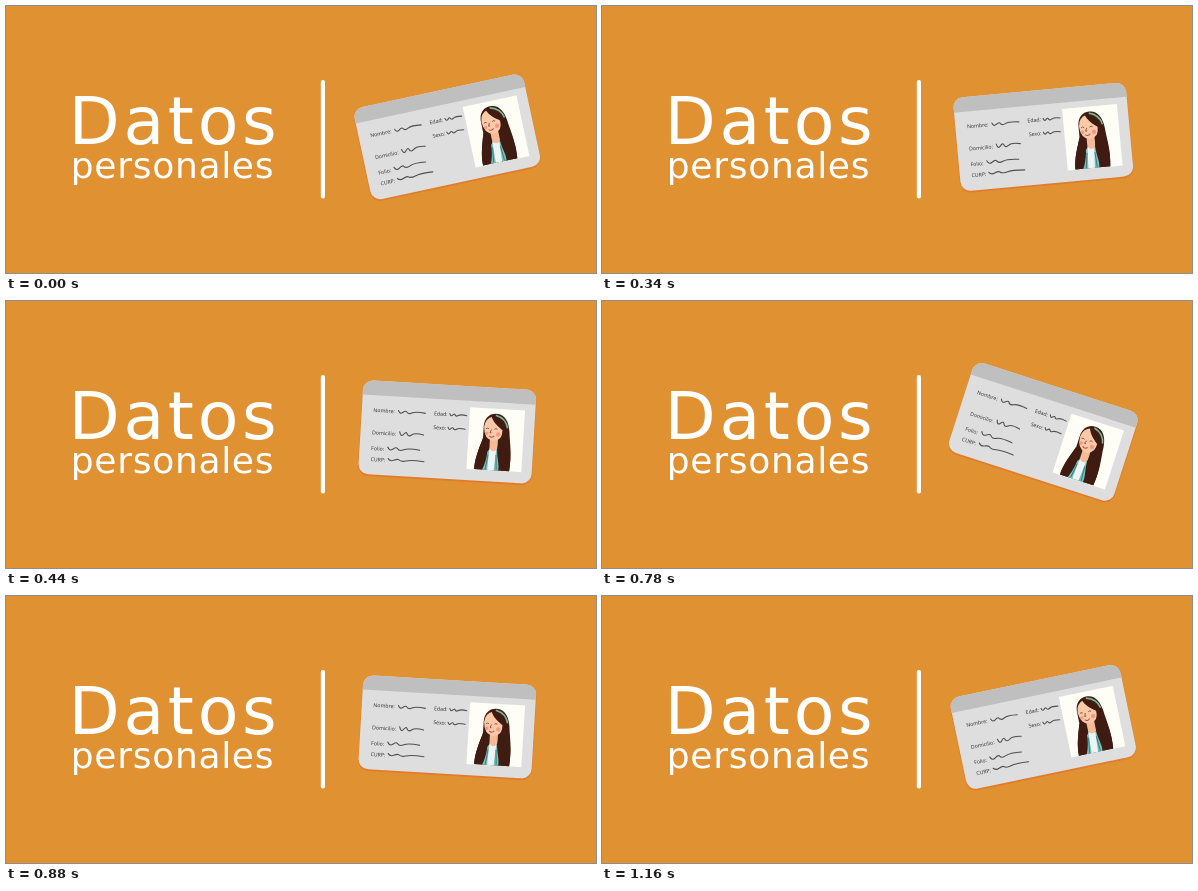
Animation, 590 px wide and 267 px high, one loop 1200 ms. Source, as an HTML page:

```html
<!DOCTYPE html>
<html lang="es">
<head>
<meta charset="utf-8">
<style>
  html, body { margin: 0; width: 100%; height: 100%; overflow: hidden; background: #e09132; }
  svg { display: block; width: 100%; height: 100%; }
  .title { fill: #fff; font-family: "DejaVu Sans", sans-serif; }
  #labels { font: 500 5.2px "Open Sans", sans-serif; fill: #2c2c2c; }
  #scribbles { fill: none; stroke: #505050; stroke-width: 1.1; stroke-linecap: round; stroke-linejoin: round; }
</style>
</head>
<body>
<svg viewBox="0 0 590 267">
  <rect width="590" height="267" fill="#e09132"/>
  <text class="title" x="62.5" y="138" font-size="66.5" letter-spacing="3.7">Datos</text>
  <text class="title" x="64.8" y="172" font-size="36" letter-spacing=".7">personales</text>
  <rect x="314.8" y="74" width="4.2" height="118.5" rx="2" fill="#fff"/>

  <g transform="translate(441.3 132.2)">
    <rect class="tilt" x="-86.7" y="-47" width="173.4" height="94" rx="10" fill="#e27b2b" stroke="#e27b2b" stroke-width=".8"/>
  </g>
  <g transform="translate(441.3 130.9)">
    <g class="tilt">
      <rect x="-86.7" y="-47" width="173.4" height="94" rx="10" fill="#dedede"/>
      <path d="M-86.7-32.4V-37a10 10 0 0 1 10-10H76.7a10 10 0 0 1 10 10V-32.4Z" fill="#c0bfbf"/>
      <g id="labels"></g>
      <g id="scribbles"></g>

      <rect x="21.3" y="-26" width="55" height="61.8" fill="#fffef6"/>
      <g id="portrait">
        <path d="M36-7C36-16 41-21 48-21C57-21 61-13 62-4C63 8 66 18 64 35.5H29C29 24 33 14 36 4Z" fill="#3f1b12"/>
        <path d="M36 35.5C36 27 38 20 43 15H51C55 20 56 27 56 35.5Z" fill="#78bfba"/>
        <path d="M43 14H50L48.5 35.5H42Z" fill="#eef4f3"/>
        <path d="M43 2H51V14Q47 19 43 14Z" fill="#f4bb98"/>
        <path d="M36.5-7Q37-16 45-18Q55-15 56-5Q55 6 46 6.5Q37 5 36.5-7Z" fill="#f9c9a8"/>
        <path d="M43-19C45-12 51-8 55-5C55 5 50 9 51 18C52 26 54 31 53 35.5H64C66 18 62 7 61-4C59-16 53-21 43-19Z" fill="#3f1b12"/>
        <path d="M36 4C38 9 42 12 41 20C40 27 39 31 37 35.5H29C29 24 33 14 36 4Z" fill="#3f1b12"/>
        <path d="M47.5-19.5Q58-17 60-7" fill="none" stroke="#78b68f" stroke-width="1.6"/>
        <path d="M42 20L40 35M50 20L51 35" fill="none" stroke="#337f80" stroke-width=".9"/>
        <g fill="#f29a83"><circle cx="39.5" cy="-1" r="1.7"/><circle cx="51" cy="-.5" r="2.2"/></g>
        <path d="M38.5-5.5q1.5-1.4 3 0M47-5.5q1.5-1.4 3 0M44-5l-1.3 3.2h1.5" fill="none" stroke="#633327" stroke-width=".7"/>
        <path d="M42 1.5q2.5 2.5 5-.3" fill="none" stroke="#c8433c" stroke-width="1"/>
      </g>
    </g>
  </g>
</svg>
<script>
  // label, x, baseline, scribble x, y, length, wave height
  const fields = [
    ["Nombre:", -75, -15.6, -50, -18.5, 27, 2.2],
    ["Edad:", -14.3, -15.8, 1.5, -18.4, 17, 1.8],
    ["Sexo:", -14.2, -2, 0.5, -4.7, 17, 1.8],
    ["Domicilio:", -75, 6.8, -47.5, 2.8, 24, 3],
    ["Folio:", -75, 22.6, -58.5, 18.6, 32, 2.4],
    ["CURP:", -75, 33.6, -57.5, 30.2, 36, 1.6]
  ];

  const scribble = (x, y, w, h) =>
    `<path d="M${x} ${y}q${w * .06} ${h * 1.8} ${w * .16} ${h * .8}t${w * .14} ${-h * .5}` +
    `q${w * .06} ${h * 1.4} ${w * .2} ${h * .5}t${w * .5} ${-h * .2}"/>`;

  const fill = (id, draw) => document.getElementById(id).innerHTML = fields.map(draw).join("");
  fill("labels", ([name, x, y]) => `<text x="${x}" y="${y}">${name}</text>`);
  fill("scribbles", ([, , , x, y, w, h]) => scribble(x, y, w, h));

  // [end time in ms, angle in degrees]
  const poses = [[200, -12.1], [440, -5.3], [640, 3.4], [880, 17.9], [1160, 3.4], [1200, -11.8]];
  const cards = document.querySelectorAll(".tilt");
  const start = performance.now();

  function draw(now) {
    const t = Math.max(0, now - start) % 1200;
    const angle = poses.find(([end]) => t < end)[1];
    cards.forEach(card => card.setAttribute("transform", `rotate(${angle})`));
    requestAnimationFrame(draw);
  }
  draw(start);
</script>
</body>
</html>
```
